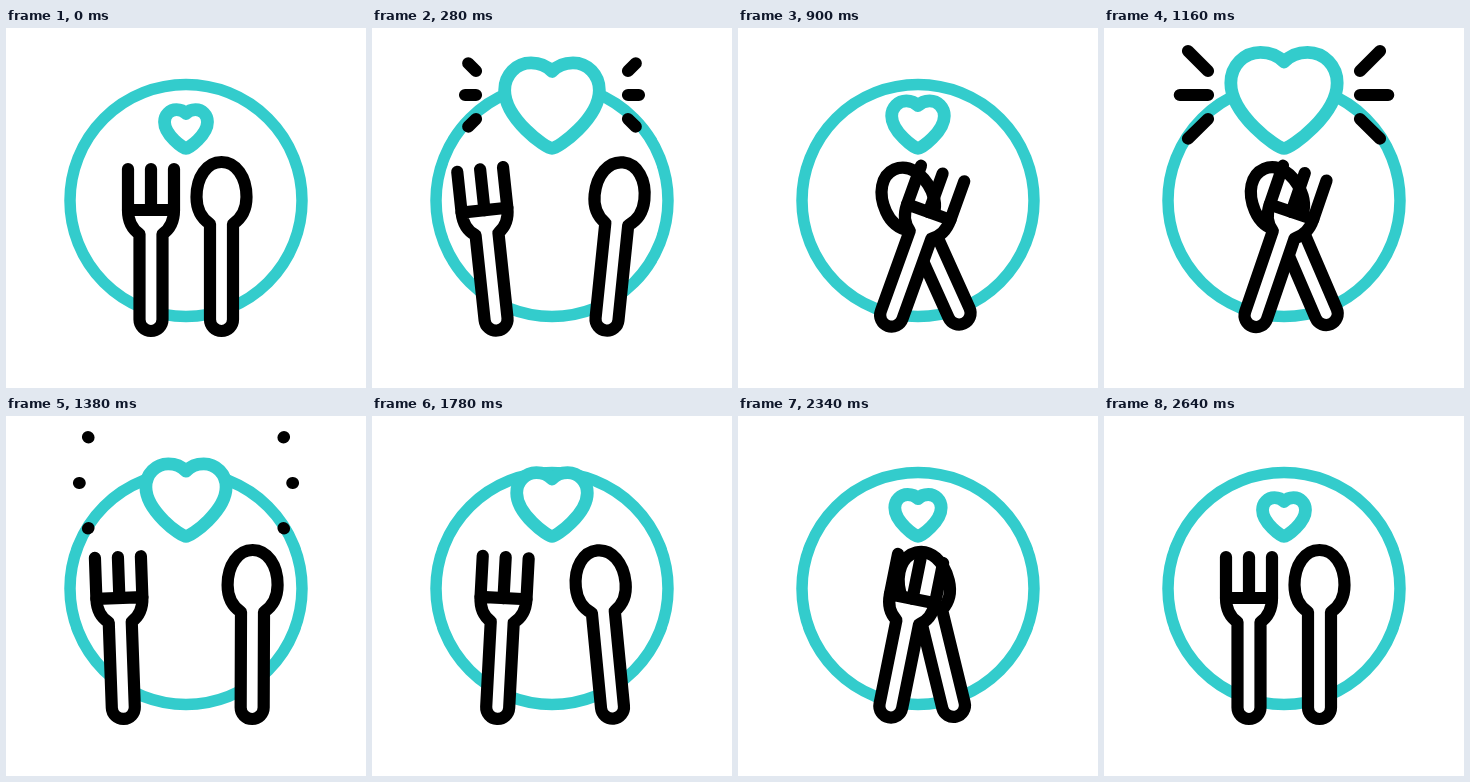
Animation of 360x360 px, one loop 2.8 s. Source, as an HTML page:

```html
<!DOCTYPE html>
<html lang="en">
<head>
<meta charset="utf-8">
<title>Plate, heart and cutlery</title>
<style>
  html, body { margin: 0; width: 100%; height: 100%; overflow: hidden; background: #fff; }
  svg { display: block; width: 100%; height: 100%; }
  path, circle { stroke-linecap: round; stroke-linejoin: round; }
  .teal { stroke: #33cccc; stroke-width: 11.5; fill: #fff; }
  .black { stroke: #000; stroke-width: 12.2; fill: #fff; }
  .line { fill: none; }
</style>
</head>
<body>
<svg viewBox="0 0 360 360">
  <circle class="teal" cx="180" cy="172.5" r="116"/>
  <path id="heart" class="teal" d="M0 0C-7 0-52-33-52-64C-52-81-39-94-23-94C-13-94-5-90 0-84.500C5-90 13-94 23-94C39-94 52-81 52-64C52-33 7 0 0 0Z"/>
  <path id="marks" class="black line"/>
  <g id="spoon">
    <path class="black" d="M204 196C195 190 190.500 180 190.500 169C190.500 149 201 134 215.500 134S240.500 149 240.500 169C240.500 180 236 190 227 196V291.500a11.500 11.500 0 0 1-23 0Z"/>
  </g>
  <g id="fork">
    <path class="black" d="M122 182C122 194 126 201 133.500 206V291.500a11.500 11.500 0 0 0 23 0V206C164 201 168 194 168 182Z"/>
    <path class="black line" d="M122 141V182M145 141V182M168 141V182"/>
  </g>
</svg>
<script>
const LOOP = 2800, BEAT = 800, BEATS = 3;
const el = id => document.getElementById(id);
const ease = p => (1 - Math.cos(Math.PI * Math.min(1, Math.max(0, p)))) / 2;
const mix = (a, b, s) => a + (b - a) * s;

// Swing steps: time and pose (rest, out, in)
const steps = [[0, 'rest'], [600, 'out'], [1000, 'in'], [1600, 'out'], [2000, 'in'], [2640, 'rest']];

// Poses: sideways shift and tilt about the pivot
const tools = [
  { node: el('fork'), x: 145, y: 217, rest: [0, 0], out: [-64, -13.5], in: [50.3, 25.4] },
  { node: el('spoon'), x: 215.5, y: 218, rest: [0, 0], out: [60, 13], in: [-38.8, -30.5] }
];

// Rays on the left: inner and outer end; the right side mirrors them
const rays = [[104, 43, 82, 21], [104, 67, 73, 67], [104, 91, 82, 112.5]];

function swing(t) {
  let i = 0;
  while (i < steps.length - 2 && t >= steps[i + 1][0]) i++;
  const [t0, from] = steps[i], [t1, to] = steps[i + 1];
  const s = ease((t - t0) / (t1 - t0));
  for (const o of tools) {
    const dx = mix(o[from][0], o[to][0], s);
    const tilt = mix(o[from][1], o[to][1], s);
    o.node.setAttribute('transform', `translate(${dx} 0) rotate(${tilt} ${o.x} ${o.y})`);
  }
}

function beat(t) {
  const b = t < BEAT * BEATS ? t % BEAT : 0;
  const k = mix(0.413, 1.037, (1 - Math.cos(2 * Math.PI * b / BEAT)) / 2);
  el('heart').setAttribute('transform', `translate(180 120.4) scale(${k})`);
  el('heart').style.strokeWidth = 12.8 / k;

  let d = '';
  if (b > 200 && b < 600) {
    const tail = ease((b - 400) / 200), head = ease((b - 200) / 200);
    for (const [x0, y0, x1, y1] of rays) {
      const ax = mix(x0, x1, tail), ay = mix(y0, y1, tail);
      const bx = mix(x0, x1, head), by = mix(y0, y1, head);
      d += `M${ax} ${ay}L${bx} ${by}M${360 - ax} ${ay}L${360 - bx} ${by}`;
    }
  }
  el('marks').setAttribute('d', d);
}

const start = performance.now();
function draw(now) {
  const t = Math.max(0, now - start) % LOOP;
  swing(t);
  beat(t);
  requestAnimationFrame(draw);
}
draw(start);
</script>
</body>
</html>
```
